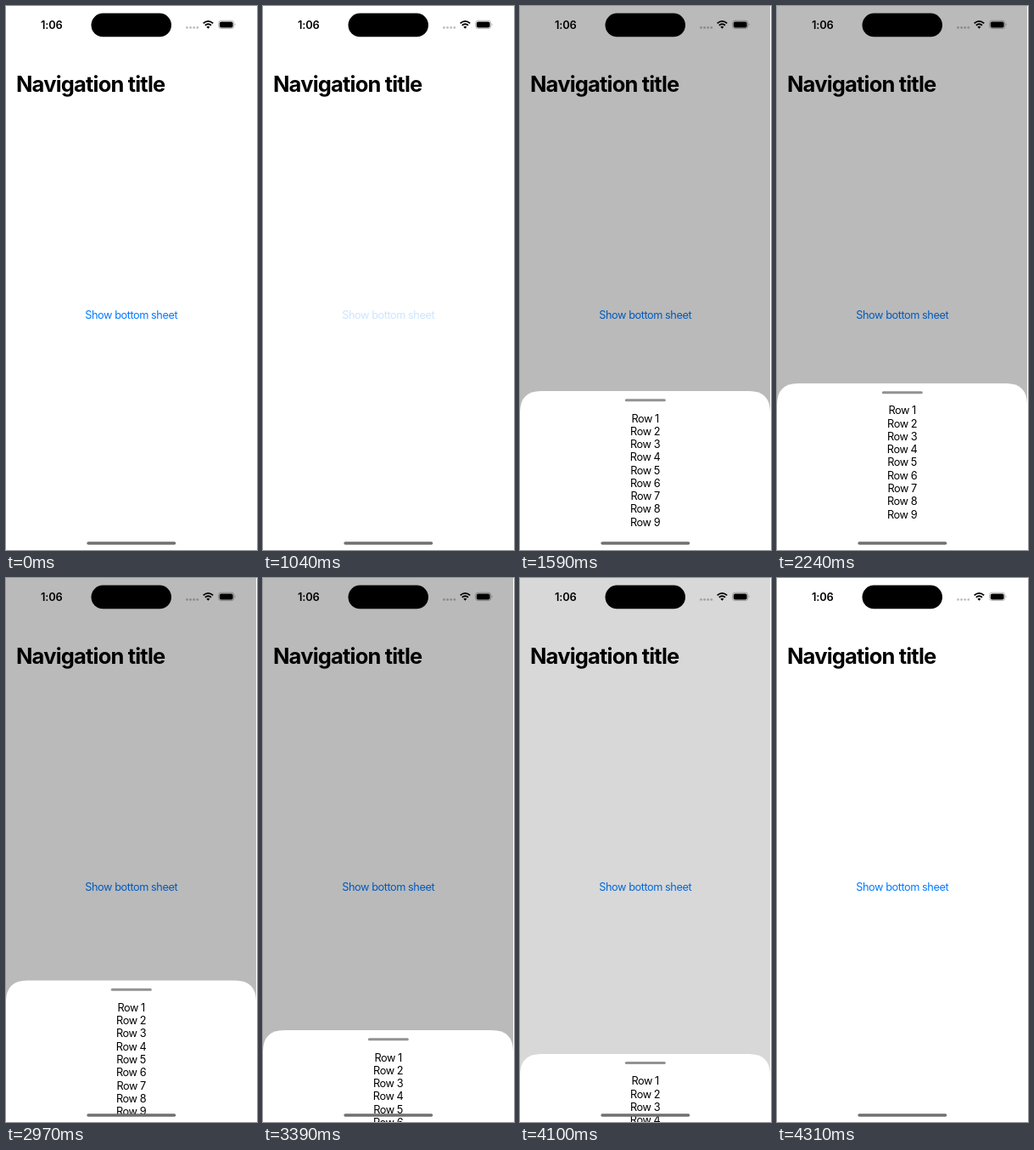
Recreate the animation shown at these times as an HTML page. Size 296 px wide and 640 px high, loop 4370 ms.

```html
<!DOCTYPE html>
<html lang="en">
<head>
<meta charset="utf-8">
<title>Bottom sheet</title>
<style>
  html, body { margin: 0; width: 100%; height: 100%; overflow: hidden; background: #fff; }
  svg { display: block; width: 295px; height: 640px; overflow: hidden; }
  text { font: 12.76px Inter, sans-serif; letter-spacing: -.035em; }
  .middle { text-anchor: middle; }
  #title { font-size: 25.5px; font-weight: 700; letter-spacing: -.032em; }
  #clock { font-size: 12.8px; font-weight: 600; letter-spacing: -.01em; }
  #link { fill: #007aff; }
</style>
</head>
<body>
<svg viewBox="0 0 295 640">
  <text id="title" x="12" y="100.7">Navigation title</text>
  <text id="link" class="middle" x="147.7" y="368.4">Show bottom sheet</text>
  <rect id="dim" width="295" height="640" opacity="0"/>

  <g id="sheet">
    <path d="M0 260V25Q0 0 25 0H270Q295 0 295 25V260Z" fill="#fff"/>
    <rect x="123.8" y="9.2" width="48" height="3" rx="1.5" fill="#929292"/>
  </g>

  <text id="clock" class="middle" x="53.8" y="26.7">1:06</text>
  <rect x="100.5" y="8.6" width="94.5" height="27.6" rx="13.8"/>
  <g fill="#000" fill-opacity=".25">
    <circle cx="213.5" cy="25.4" r="1.4"/>
    <circle cx="217.6" cy="25.4" r="1.4"/>
    <circle cx="221.7" cy="25.4" r="1.4"/>
    <circle cx="225.8" cy="25.4" r="1.4"/>
  </g>
  <g fill="none" stroke="#000" stroke-width="1.8">
    <path d="M232.6 20.4Q238.4 15.4 244.2 20.4"/>
    <path d="M234.8 22.8Q238.4 19.8 242 22.8"/>
  </g>
  <path d="M236.4 24.5Q238.4 23 240.4 24.5L238.4 26.7Z"/>
  <rect x="250.6" y="17.2" width="18.2" height="9.4" rx="3" fill="none" stroke="#000" stroke-opacity=".35" stroke-width=".8"/>
  <rect x="251.8" y="18.4" width="15.8" height="7" rx="2"/>
  <path d="M269.8 20.3Q271.4 21.9 269.8 23.5Z" fill-opacity=".4"/>
  <rect x="95.3" y="630.2" width="105" height="3.6" rx="1.8" fill="#707070"/>
</svg>
<script>
const LOOP = 4370, REST_Y = 453, SHEET_HEIGHT = 250;
// Moments at which the picture refreshes; it holds still in between.
const TICKS = [0, 1040, 1160, 1270, 1370, 1480, 1590, 1700, 1810, 1910, 2010, 2120, 2240,
  2340, 2440, 2540, 2650, 2760, 2870, 2970, 3080, 3180, 3290, 3390, 3490, 3590, 3690,
  3790, 3890, 3990, 4100, 4200, 4310];

const $ = id => document.getElementById(id);
const progress = (t, start, length) => Math.min(1, Math.max(0, (t - start) / length));
const settle = p => 1 - (1 - p) ** 2.5;
const smooth = p => p * p * (3 - 2 * p);

// A finger drag by `distance`, then a release that springs back.
const drag = (t, start, length, release, back, distance) =>
  distance * smooth(progress(t, start, length)) * (1 - settle(progress(t, release, back)));

for (let i = 1; i <= 9; i++) {
  $('sheet').insertAdjacentHTML('beforeend',
    `<text class="middle" x="147.6" y="${36.5 + (i - 1) * 15.26}">Row ${i}</text>`);
}

function draw(t) {
  const shown = settle(progress(t, 1040, 500)) - settle(progress(t, 4050, 250));
  const y = REST_Y + (1 - shown) * SHEET_HEIGHT
    + drag(t, 1900, 220, 2120, 420, -21)
    + drag(t, 2820, 450, 3420, 380, 79);
  $('sheet').setAttribute('transform', `translate(0 ${y.toFixed(2)})`);
  $('dim').setAttribute('opacity', .27 * shown);
  $('link').setAttribute('opacity', t < 1040 ? 1 : .2 + .8 * progress(t, 1040, 440));
}

function frame() {
  const t = performance.now() % LOOP;
  draw(TICKS.findLast(tick => tick <= t));
  requestAnimationFrame(frame);
}
frame();
</script>
</body>
</html>
```
